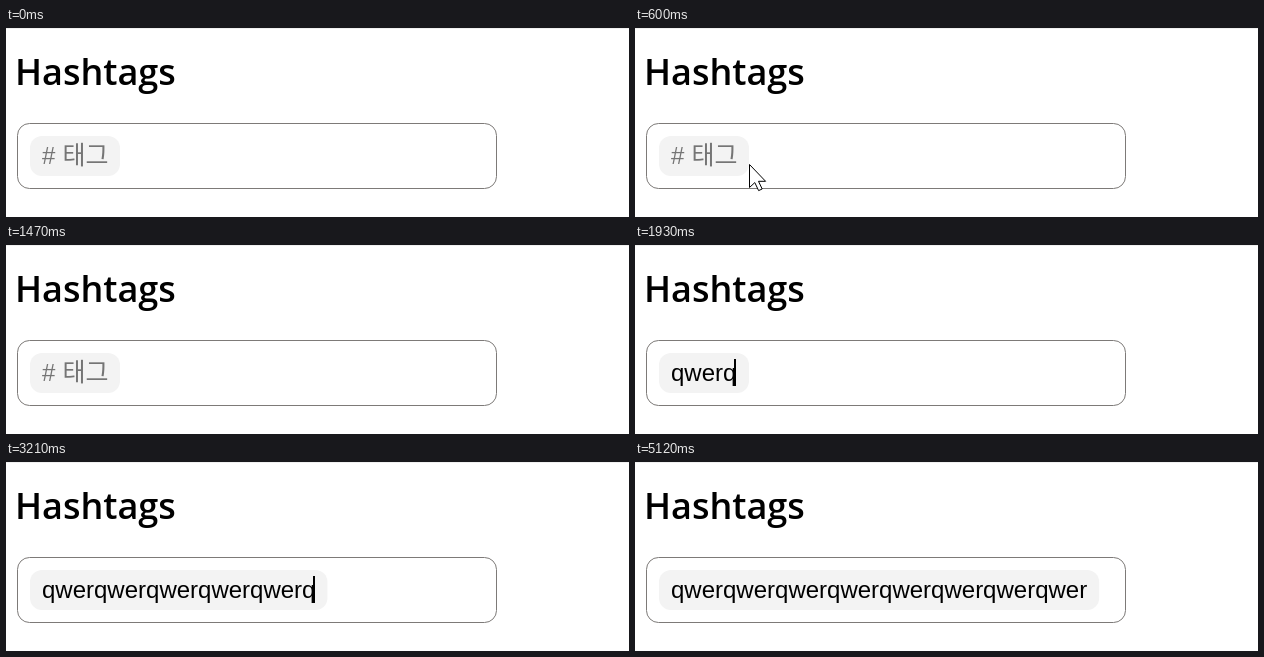
Write an HTML page that moves like this. It is 623 px wide and 189 px high and loops after 5200 ms.

```html
<!DOCTYPE html>
<html lang="ko">
<head>
<meta charset="utf-8">
<title>Hashtags</title>
<style>
  html, body { margin: 0; width: 100%; height: 100%; overflow: hidden; background: #fff; }
  svg { display: block; }
  text { white-space: pre; }
  .title { font: 600 36px "Open Sans", "Noto Sans", sans-serif; }
  .field { font: 24px "Liberation Sans", Arial, sans-serif; }
  .hangul { font: 300 25px "Noto Sans CJK KR", "Noto Sans CJK", "Noto Sans CJK JP", sans-serif; }
</style>
</head>
<body>
<svg width="623" height="189" viewBox="0 0 623 189">
  <rect width="623" height="1" fill="#f0f0f0"/>
  <text class="title" x="9" y="57">Hashtags</text>
  <rect x="11.5" y="95.5" width="479" height="65" rx="12" fill="#fff" stroke="#7d7a78"/>
  <rect id="pill" x="24" y="108" width="90" height="40" rx="12" fill="#f3f3f3"/>
  <g id="hint" fill="#757575">
    <text class="field" x="36" y="136">#</text>
    <text class="hangul" x="56.5" y="136">태그</text>
  </g>
  <text id="typed" class="field" x="36" y="136"></text>
  <rect id="caret" y="114" width="2" height="27"/>
  <circle id="click" cx="87" cy="131" r="17.5" fill="#fff000" fill-opacity=".66"/>
  <path id="beam" d="M-7 -11.5H-2L0 -9.5L2 -11.5H7M-7 11.5H-2L0 9.5L2 11.5H7M0 -10V10"
        fill="none" stroke="#333" stroke-width="1.7"/>
  <path id="arrow" d="M.5 .5V23.5L5.8 18.6L9.6 26.6L13.2 25L9.5 17.3H16.6Z"
        fill="#fff" stroke="#000"/>
</svg>
<script>
const LOOP = 5200;
const [pill, hint, typed, caret, click, beam, arrow] =
  ["pill", "hint", "typed", "caret", "click", "beam", "arrow"].map(id => document.getElementById(id));

// Key times of each typed "qwer"
const bursts = [
  [1590, 1630, 1670, 1710],
  [1930, 1960, 1990, 2020],
  [2210, 2250, 2290, 2340],
  [2550, 2590, 2630, 2680],
  [2890, 2930, 2970, 3010],
  [3210, 3310, 3360, 3410],
  [3620, 3690, 3690, 3740],
  [3940, 3960, 4010, 4060]
];
const keys = bursts.flat();

const show = (el, on) => el.setAttribute("visibility", on ? "visible" : "hidden");
const within = (t, from, to) => t >= from && t < to;
const mix = (a, b, u) => a + (b - a) * u;

function place(el, on, x = 0, y = 0) {
  show(el, on);
  el.setAttribute("transform", `translate(${x} ${y})`);
}

// Progress from 0 to 1 in equal hard steps
function stepped(t, from, to, steps) {
  const u = Math.min(1, Math.max(0, (t - from) / (to - from)));
  return Math.floor(u * steps + 1e-6) / steps;
}

function drawPointer(t) {
  const leaving = within(t, 1160, 1180);
  const u = stepped(t, 80, 600, 18) ** 1.43;
  const x = leaving ? 83 : Math.round(mix(365, 114, u));
  const y = leaving ? 166 : Math.round(mix(182, 136, u));
  place(arrow, leaving || within(t, 80, 630), x, y);

  const v = stepped(t, 630, 710, 4);
  place(beam, within(t, 630, 1160), Math.round(mix(110, 89, v)), mix(135.5, 132.5, v));
  show(click, within(t, 920, 1000));
}

function drawField(t) {
  const count = keys.filter(k => k <= t).length;
  const text = "qwer".repeat(8).slice(0, count);
  if (typed.textContent !== text) typed.textContent = text;
  show(hint, count === 0);
  const width = count ? typed.getComputedTextLength() : 0;
  pill.setAttribute("width", Math.max(90, width + 24));
  caret.setAttribute("x", Math.max(36, Math.round(36 + width) - 2));
  show(caret, within(t, 960, 1470) || within(t, keys[0], 4580) || within(t, 5100, 5120));
}

function draw(t) {
  drawPointer(t);
  drawField(t);
}

const start = performance.now();
function tick() {
  draw((performance.now() - start) % LOOP);
  requestAnimationFrame(tick);
}
tick();
</script>
</body>
</html>
```
